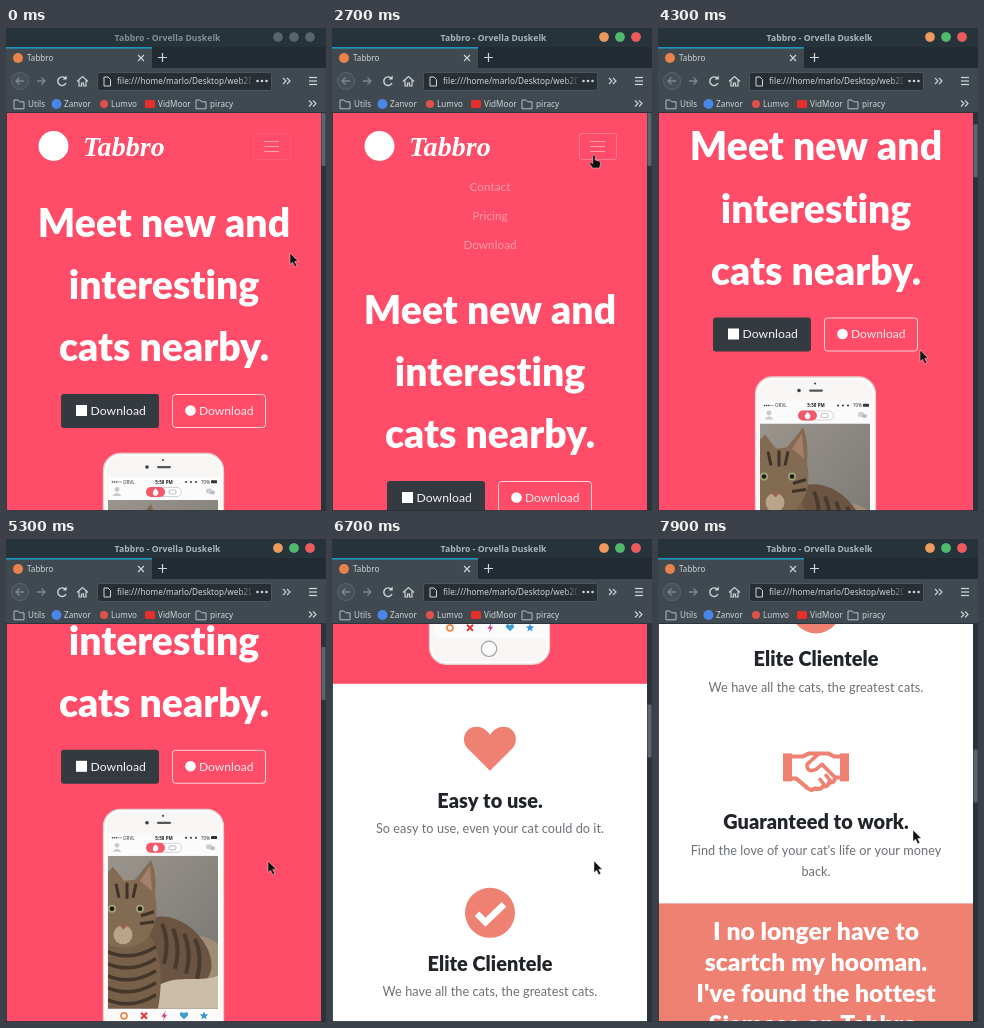
Write an HTML page with a canvas that moves like this. It is 320 px wide and 483 px high and loops after 8 s.

```html
<!DOCTYPE html>
<html lang="en">
<head>
<meta charset="utf-8">
<title>Tabbro</title>
<style>
html, body { margin: 0; width: 100%; height: 100%; overflow: hidden; background: #27333a; }
canvas { display: block; width: 320px; height: 483px; }
</style>
</head>
<body>
<canvas id="stage"></canvas>
<script>
const W = 320, H = 483, LOOP = 8000, TOP = 85, MID = 158;
const PINK = '#ff4c68', CORAL = '#ef8172', INK = '#212529';
const BAR = '#27333a', STRIP = '#222b31', TOOL = '#3f494f';
const PAGE = 'Lato, sans-serif', UI = '"Noto Sans", sans-serif';
const canvas = document.getElementById('stage');
const dpr = window.devicePixelRatio || 1;
canvas.width = W * dpr;
canvas.height = H * dpr;
const c = canvas.getContext('2d');
c.letterSpacing = '0.05px'; // also keeps "ti" and "tt" unjoined

// ---------- timing ----------
const WHEEL = [4050, 4300, 5500, 5750, 5950, 6150, 6350, 6900, 7150, 7400, 7700];
const NOTCH = 77.6;
const POINTER = [
  [0, 284, 225], [300, 284, 225], [1000, 270, 160], [1500, 260, 132], [1800, 262, 127],
  [3100, 262, 127], [3700, 273, 266], [4000, 262, 322], [7300, 262, 322], [7800, 255, 291]
];
const part = (t, start, len) => Math.min(1, Math.max(0, (t - start) / len));
const smooth = p => p * p * (3 - 2 * p);
const easeOut = p => 1 - (1 - p) ** 3;

const scrollAt = t => WHEEL.reduce((sum, start) => sum + NOTCH * easeOut(part(t, start, 350)), 0);
const menuAt = t => smooth(part(t, 2250, 350)) - smooth(part(t, 3000, 350));

function pointerAt(t) {
  let i = POINTER.length - 1;
  while (POINTER[i][0] > t) i--;
  const a = POINTER[i], b = POINTER[i + 1] || a;
  const p = b === a ? 0 : smooth(part(t, a[0], b[0] - a[0]));
  return [a[1] + (b[1] - a[1]) * p, a[2] + (b[2] - a[2]) * p];
}

// ---------- helpers ----------
function rect(x, y, w, h, fill) {
  c.fillStyle = fill;
  c.fillRect(x, y, w, h);
}
function round(x, y, w, h, r, fill, stroke, lw = 1) {
  c.beginPath();
  c.roundRect(x, y, w, h, r);
  if (fill) { c.fillStyle = fill; c.fill(); }
  if (stroke) { c.strokeStyle = stroke; c.lineWidth = lw; c.stroke(); }
}
function disc(x, y, r, fill, stroke, lw = 1) {
  round(x - r, y - r, 2 * r, 2 * r, r, fill, stroke, lw);
}
function shape(d, fill, stroke, lw = 1) {
  const p = new Path2D(d);
  if (fill) { c.fillStyle = fill; c.fill(p); }
  if (stroke) { c.strokeStyle = stroke; c.lineWidth = lw; c.stroke(p); }
}
function at(x, y, draw, scale = 1) {
  c.save();
  c.translate(x, y);
  c.scale(scale, scale);
  draw();
  c.restore();
}
function text(s, x, y, font, fill, align = 'left') {
  c.font = font;
  c.fillStyle = fill;
  c.textAlign = align;
  c.fillText(s, x, y);
}
const centred = (s, y, size, weight, fill) =>
  text(s, MID, y, `${weight} ${size}px ${PAGE}`, fill, 'center');

const HEART = 'M0 22 L-23 -1 C-29 -8 -26 -22 -13 -22 C-7 -22 -3 -18 0 -14 C3 -18 7 -22 13 -22 C26 -22 29 -8 23 -1 Z';

// ---------- browser ----------
function folder(x) {
  shape(`M${x} 72 h4 l1.5 1.8 h4.5 v7 h-10 z`, null, '#b4bcc0', 1);
}

function chrome(focus) {
  const light = '#cfd5d8', dim = '#7d878c';
  rect(0, 0, W, 19, BAR);
  c.globalAlpha = 0.7 + 0.3 * focus;
  text('Tabbro - Orvella Duskelk', 161.5, 12.5, `bold 8.6px ${UI}`, '#a9b6bb', 'center');
  c.globalAlpha = 1;
  ['#ee9a5c', '#4fb96c', '#ec5a5c'].forEach((col, i) => {
    const x = 272 + 16 * i;
    disc(x, 9, 4.8, '#59666d');
    c.globalAlpha = focus;
    disc(x, 9, 4.8, col);
    c.globalAlpha = 1;
  });

  rect(0, 19, W, 21, STRIP);
  rect(0, 19, 146, 66, TOOL);
  rect(0, 19, 146, 1.6, '#1c97c0');
  disc(12, 30, 5, '#e8824a');
  text('Tabbro', 21, 33, `8px ${UI}`, light);
  shape('M132 27 l6 6 m0 -6 l-6 6', null, light, 1.1);
  shape('M156.5 25 v9 m-4.5 -4.5 h9', null, light, 1.2);

  rect(0, 40, W, 45, TOOL);
  disc(14, 53, 8.5, '#465056', '#5b656b');
  shape('M18 53 h-8 m3.5 -3.5 l-3.5 3.5 l3.5 3.5', null, dim, 1.3);
  shape('M31 53 h8 m-3.5 -3.5 l3.5 3.5 l-3.5 3.5', null, dim, 1.3);
  shape('M59.5 50.5 a4.3 4.3 0 1 0 0.5 4.5', null, light, 1.4);
  shape('M60.7 47.5 v4 h-4 z', light);
  shape('M71 53.5 l5.5 -5 l5.5 5 M73 52.5 v5.5 h2.5 v-3 h2 v3 h2.5 v-5.5', null, light, 1.2);
  round(91.5, 44.5, 174, 18, 2, '#272f35', '#4b555b');
  shape('M98 49 h4 l2.5 2.5 v6.5 h-6.5 z', null, light, 1);
  c.save();
  c.beginPath();
  c.rect(108, 45, 138, 17);
  c.clip();
  const fade = c.createLinearGradient(232, 0, 246, 0);
  fade.addColorStop(0, light);
  fade.addColorStop(1, 'rgba(207,213,216,0.1)');
  text('file:///home/marlo/Desktop/web2Dev', 111, 56, `8.2px ${UI}`, fade);
  c.restore();
  [251.5, 256, 260.5].forEach(x => disc(x, 53, 1.3, light));
  for (const [x, y] of [[277, 53], [303, 75.5]])
    shape(`M${x} ${y - 3} l3 3 l-3 3 m4 -6 l3 3 l-3 3`, null, light, 1.1);
  [49.5, 53, 56.5].forEach(y => rect(303, y - 0.6, 8, 1.2, light));

  folder(8);
  folder(190);
  disc(50.5, 76, 5, '#4a86e8');
  disc(98, 76, 4, '#e0514c');
  round(139, 72, 10, 8, 1.5, '#e62f2b');
  [['Utils', 22], ['Zanvor', 58], ['Lumvo', 105], ['VidMoor', 152], ['piracy', 204]]
    .forEach(([s, x]) => text(s, x, 78.7, `8.1px ${UI}`, light));
  rect(0, 84, W, 1, '#2c353b');
}

function scrollbar(scroll) {
  rect(315, TOP, 5, H - TOP, '#28333a');
  round(315.5, TOP + scroll * 0.148, 4, 53, 1, '#5a666c');
}

// ---------- page ----------
function navbar(strong, open) {
  disc(47.5, 118, 15, '#fff');
  text('Tabbro', 77, 127.5, 'italic bold 28px "Liberation Serif", serif', '#fff');
  round(247.5, 105.5, 37, 26, 2.5, null, `rgba(255,255,255,${strong ? 0.25 : 0.07})`);
  [113, 118, 123].forEach(y => rect(258, y, 15, 1, 'rgba(255,255,255,0.47)'));
  if (open <= 0) return;
  c.save();
  c.beginPath();
  c.rect(0, 144, 315, 87 * open);
  c.clip();
  ['Contact', 'Pricing', 'Download'].forEach((s, i) =>
    centred(s, 163 + 29 * i, 11.7, 400, 'rgba(255,255,255,0.43)'));
  c.restore();
}

function hero() {
  ['Meet new and', 'interesting', 'cats nearby.'].forEach((s, i) =>
    centred(s, 209 + 62.2 * i, 39.1, 900, '#fff'));
  round(55, 366, 98, 34, 3, '#343a40');
  rect(70, 377, 11, 11, '#fff');
  text('Download', 84.5, 387, `12.2px ${PAGE}`, '#f4f5f5');
  round(166.5, 366.5, 93, 33, 3, null, 'rgba(255,255,255,0.75)');
  disc(184.5, 382.5, 5.3, '#fff');
  text('Download', 193, 387, `12px ${PAGE}`, 'rgba(255,255,255,0.88)');
}

function catPhoto() {
  c.save();
  c.beginPath();
  c.rect(102, 472, 110, 153);
  c.clip();
  const wall = c.createLinearGradient(102, 472, 212, 570);
  wall.addColorStop(0, '#9a958c');
  wall.addColorStop(1, '#7d7a76');
  rect(102, 472, 110, 153, wall);
  shape('M140 570 C170 545 195 548 212 560 V625 H140 Z', '#a18c76');
  // back and flank
  shape('M140 536 C162 526 190 540 202 566 C212 590 200 604 176 604 L140 625 Z', '#6b5442');
  for (let i = 0; i < 4; i++)
    shape(`M${156 + 11 * i} ${540 + 5 * i} q8 18 2 40`, null, '#493a2f', 4);
  shape('M146 606 C168 588 192 600 212 592 V625 H142 Z', '#cbbda8');
  // chest
  shape('M102 548 H140 C154 562 158 592 152 625 H102 Z', '#775f49');
  for (let i = 0; i < 5; i++)
    shape(`M102 ${568 + 12 * i} q24 10 48 -5`, null, '#44362b', 3.4);
  // head
  shape('M102 488 L107 483 L118 497 L129 496 L145 476 C150 488 150 500 149 512 C154 535 146 556 130 562 C118 566 108 564 102 560 Z', '#836b53');
  shape('M134 497 L144 482 L146 507 Z', '#a57f6a');
  shape('M110 500 l3 14 m8 -15 v16 m9 -15 l-3 14 m21 14 l-13 4 m13 6 l-14 2', null, '#3f3228', 3);
  disc(117, 551, 9.5, '#b9a389');
  for (const x of [106, 134]) {
    disc(x, 525, 4, '#a3a276');
    disc(x, 525, 2.3, '#1d1b18');
  }
  shape('M113 541 h9 l-4.5 5 z', '#9c5f50');
  c.restore();
}

function phone() {
  round(97.5, 425.5, 120, 243, 17, '#f8f6f5', '#e3d3cf', 1.3);
  round(99.5, 427.5, 116, 239, 15, null, '#ffffff', 1.5);
  disc(157, 432, 1.1, '#4a4a4a');
  disc(141, 439, 1.8, '#3d3d44');
  round(151, 438, 14, 2.2, 1.1, '#55555a');
  rect(102, 449, 112, 193, '#fbfbfb');
  for (let i = 0; i < 5; i++) disc(106.5 + 2.1 * i, 454, 0.8, i < 3 ? '#333' : '#999');
  text('ORVL', 117, 455.7, `4.5px ${UI}`, '#333');
  text('5:58 PM', MID, 455.7, `bold 4.5px ${UI}`, '#222', 'center');
  text('70%', 195, 455.7, `4.5px ${UI}`, '#333');
  round(205, 452.3, 6, 3, 0.5, '#333');
  [180, 185, 190].forEach(x => disc(x, 454, 1.1, '#444'));

  disc(111, 461.5, 2.4, '#c9c9cc');
  shape('M106.5 468 q4.5 -6 9 0 z', '#c9c9cc');
  round(140.5, 459.5, 35, 9, 4.5, '#fff', '#d3d3d6');
  round(140, 459, 19, 10, 5, '#f2596b');
  shape('M149.5 460.5 q4.5 3.5 2 6.5 q-2 1.5 -4 0 q-2 -3 2 -6.5', '#fff');
  round(163, 462, 7, 4, 1.5, null, '#c5c5ca', 1.2);
  round(200, 460.5, 6, 5, 2, '#cfcfd3');
  round(204, 462.5, 5, 4, 2, '#bdbdc2');
  catPhoto();

  disc(118, 632, 3, null, '#ee8b4b', 1.8);
  shape('M135 629 l6 6 m0 -6 l-6 6', null, '#e2353e', 2);
  shape('M159.5 627 l-4 6 h2.5 l-1 4 l4 -6 h-2.5 z', '#c93d8c');
  at(178, 632, () => shape(HEART, '#3c9fd0'), 0.16);
  at(198, 632, () => {
    let d = '';
    for (let i = 0; i < 10; i++) {
      const r = i % 2 ? 1.9 : 4.4, a = i * Math.PI / 5;
      d += `${i ? 'L' : 'M'}${r * Math.sin(a)} ${-r * Math.cos(a)}`;
    }
    shape(d + 'Z', '#3593dd');
  });
  disc(157, 653, 7.7, '#fdfdfd', '#a5a09e', 1.1);
}

function handshake() {
  c.lineJoin = c.lineCap = 'round';
  rect(-33, -18, 9, 28, CORAL);
  rect(24, -18, 9, 28, CORAL);
  shape('M-24 -15 H-13 L-7 -18 H12 L18 -15 H24 M-24 7 H-20 L-8 17 Q-5 20 -1 17 Q4 19 7 15 Q12 16 13 11 Q19 12 19 6 H24', null, CORAL, 4);
  shape('M2 -17 L-9 -7 Q-9 2 0 -2 L6 -7 L19 6 M4 8 L8 13 M10 4 L14 9', null, CORAL, 3.6);
  c.lineJoin = 'miter';
  c.lineCap = 'butt';
}

function features() {
  const title = (s, y) => centred(s, y, 19.9, 900, INK);
  const note = (s, y) => centred(s, y, 12.7, 400, '#6c7075');
  at(MID, 753, () => shape(HEART, CORAL));
  title('Easy to use.', 812);
  note('So easy to use, even your cat could do it.', 837);
  disc(MID, 917, 25, CORAL);
  at(MID, 917, () => shape('M-13 1 L-4.5 9.5 L14 -8.5', null, '#fff', 6.5));
  title('Elite Clientele', 975);
  note('We have all the cats, the greatest cats.', 1000.5);
  at(MID, 1080, handshake);
  title('Guaranteed to work.', 1138);
  note("Find the love of your cat's life or your money", 1164);
  note('back.', 1185);
}

function quote() {
  rect(0, 1212, 315, 400, CORAL);
  ['I no longer have to', 'scartch my hooman.', "I've found the hottest", 'Siamese on Tabbro.']
    .forEach((s, i) => centred(s, 1249 + 31 * i, 24.6, 900, '#fff'));
}

function page(t, scroll) {
  const open = menuAt(t);
  c.save();
  c.beginPath();
  c.rect(0, TOP, 315, H - TOP);
  c.clip();
  rect(0, TOP, 315, H - TOP, '#fff');
  c.translate(0, -scroll);
  rect(0, TOP, 315, 603 + 87 * open, PINK);
  navbar(t > 2250, open);
  c.translate(0, 87 * open);
  hero();
  phone();
  features();
  quote();
  c.restore();
  rect(0, TOP, 1, H - TOP, 'rgba(39,51,58,0.88)');
  rect(0, H - 1, W, 1, 'rgba(39,51,58,0.88)');
}

function pointer(t) {
  const [x, y] = pointerAt(t);
  const hand = y < 131.5 && x > 247 && x < 284;
  const d = hand
    ? 'M-1.2 1 Q0 -1 1.2 1 V5 L5 6 Q7 6.5 6.5 9 L5.5 13 H-1.5 L-4.5 8.5 Q-4 6.5 -1.2 8.5 Z'
    : 'M0 0 V11.5 L2.6 9.2 L4.8 13.8 L6.8 12.8 L4.7 8.4 L8.2 8.2 Z';
  at(x, y, () => shape(d, '#111', 'rgba(255,255,255,0.6)', 0.7));
}

function draw(now) {
  const t = now % LOOP, scroll = scrollAt(t);
  c.setTransform(dpr, 0, 0, dpr, 0, 0);
  page(t, scroll);
  chrome(smooth(part(t, 800, 300)));
  scrollbar(scroll);
  pointer(t);
  requestAnimationFrame(draw);
}
requestAnimationFrame(draw);
</script>
</body>
</html>
```
